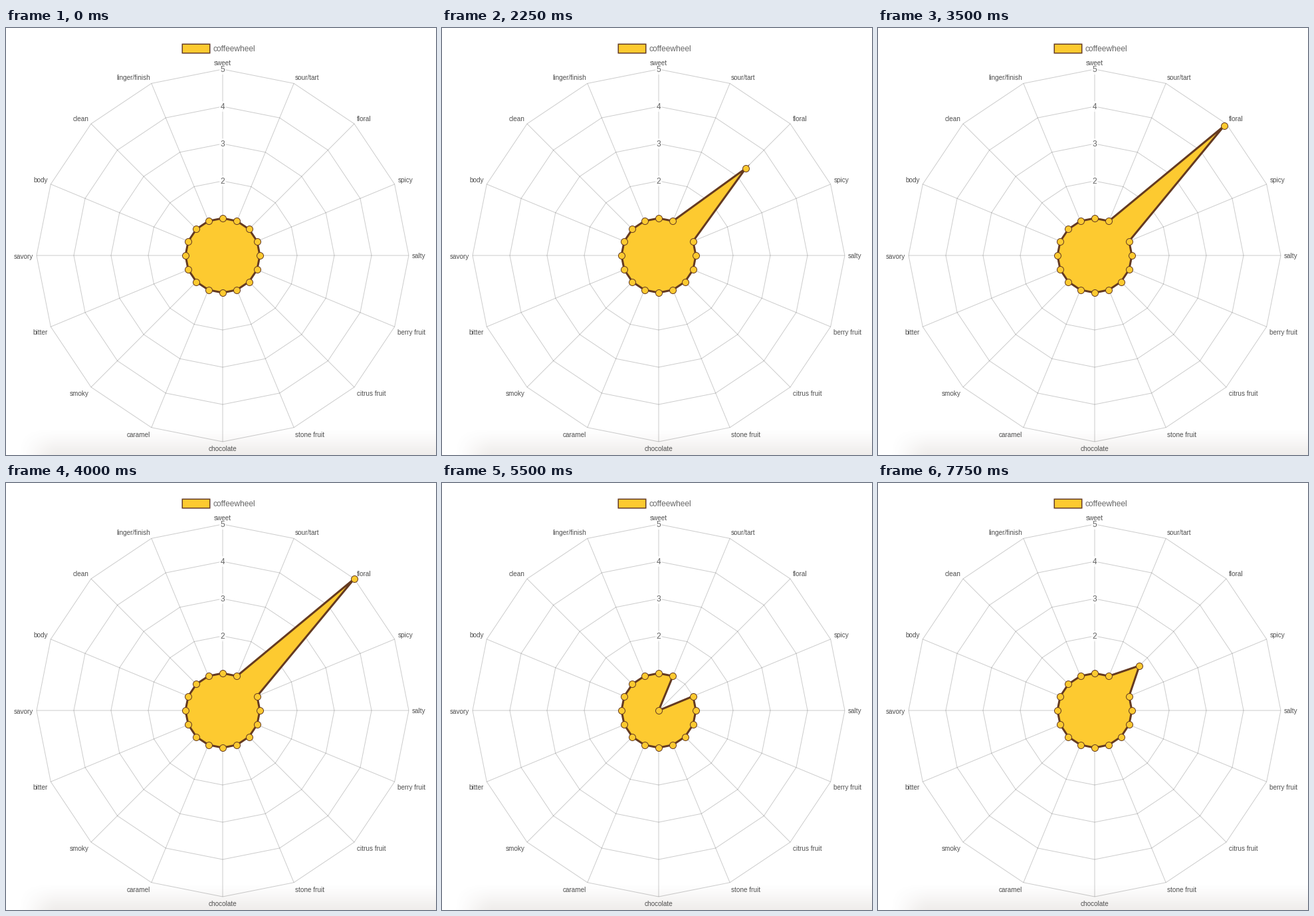
Write a matplotlib script that moves like this. It is 647x642 px and loops after 8000 ms.

```python
import numpy as np
import matplotlib.pyplot as plt
from matplotlib.animation import FuncAnimation
from matplotlib.patches import Polygon, Rectangle

W, H, DPI = 647, 642, 100
PX = 72 / DPI  # points per pixel
CX, CY, UNIT = 326, 342, 56
YELLOW, BROWN = "#fdca30", "#643a21"
GRID = (0, 0, 0, 0.2)
STEP, LOOP = 250, 8000

LABELS = ["sweet", "sour/tart", "floral", "spicy", "salty", "berry fruit",
          "citrus fruit", "stone fruit", "chocolate", "caramel", "smoky",
          "bitter", "savory", "body", "clean", "linger/finish"]
N = len(LABELS)
MOVER = LABELS.index("floral")
ANGLES = np.arange(N) * 2 * np.pi / N
AXES = np.column_stack([np.sin(ANGLES), -np.cos(ANGLES)])
CENTER = np.array([CX, CY])

# start ms, duration ms, from, to
MOVES = [(340, 1000, 1, 2), (2018, 1000, 2, 4), (3040, 1000, 4, 5),
         (4458, 875, 5, 0), (5525, 1000, 0, 2), (7665, 1000, 2, 1)]

fig = plt.figure(figsize=(W / DPI, H / DPI), dpi=DPI, facecolor="white")
ax = fig.add_axes([0, 0, 1, 1])
ax.set_xlim(0, W)
ax.set_ylim(H, 0)
ax.axis("off")


def text(x, y, s, size, color, ha="center", z=4):
    ax.text(x, y, s, fontsize=size * PX, color=color, ha=ha, va="baseline",
            family="Liberation Sans", zorder=z)


def smooth(x, lo, hi):
    t = np.clip((x - lo) / (hi - lo), 0, 1)
    return t * t * (3 - 2 * t)


def draw_shadow():
    top = 596
    y, x = np.mgrid[top:H, 0:W] + 0.5
    rgba = np.empty(x.shape + (4,))
    rgba[..., :3] = np.array([120, 100, 85]) / 255
    rgba[..., 3] = 0.13 * smooth(y, 598, 652) * smooth(x, 14, 80)
    ax.imshow(rgba, extent=(0, W, H, top), aspect="auto",
              interpolation="nearest", zorder=0)
    ax.set_xlim(0, W)
    ax.set_ylim(H, 0)


def draw_grid():
    for r in range(1, 6):
        ax.add_patch(Polygon(CENTER + AXES * r * UNIT, fill=False, ec=GRID,
                             lw=PX, snap=False, zorder=1))
    for dx, dy in AXES * 5 * UNIT:
        ax.plot([CX, CX + dx], [CY, CY + dy], color=GRID, lw=PX,
                solid_capstyle="butt", snap=False, zorder=1)


def draw_labels():
    for i, (name, axis) in enumerate(zip(LABELS, AXES)):
        x, y = CENTER + axis * (5 * UNIT + 5)
        if i in (N // 4, 3 * N // 4):
            y -= 5
        elif axis[1] < 0:
            y -= 10
        ha = "center" if i % (N // 2) == 0 else "left" if i < N // 2 else "right"
        text(x, y + 9.5, name, 10, "#505050", ha)
    for r in range(2, 6):
        y = CY - r * UNIT
        ax.add_patch(Rectangle((CX - 5.3, y - 8), 10.6, 16, fc="white",
                               alpha=0.75, lw=0, zorder=2))
        text(CX, y + 4.3, str(r), 12, "#666666")


def draw_legend():
    for grow, color in ((1.5, BROWN), (0, YELLOW)):
        ax.add_patch(Rectangle((266 - grow, 25 - grow), 40 + 2 * grow,
                               12 + 2 * grow, fc=color, lw=0, snap=False,
                               zorder=3))
    text(312, 35.2, "coffeewheel", 12, "#666666", "left")


def value(ms):
    v = MOVES[0][2]
    for start, length, a, b in MOVES:
        if ms >= start:
            t = min((ms - start) / length, 1)
            v = a + (b - a) * (1 - (1 - t) ** 4)
    return v


def spike(pts):
    """Corner of the mitred outline at the moving point, limit 10."""
    p = pts[MOVER]
    sides = [p - pts[MOVER - 1], p - pts[MOVER + 1]]
    u, w = [s / np.hypot(*s) for s in sides]
    sin_half = np.sqrt(max((1 - u @ w) / 2, 1e-9))
    out = (p - CENTER) @ AXES[MOVER]
    if out < 1.3 * UNIT or sin_half < 0.1:
        return np.array([p, p, p])
    tip = p + AXES[MOVER] * 1.5 / sin_half
    left = p + 1.5 * np.array([u[1], -u[0]])
    right = p + 1.5 * np.array([-w[1], w[0]])
    return np.array([p, left, tip, right])


draw_shadow()
draw_grid()
draw_labels()
draw_legend()

start_pts = CENTER + AXES * UNIT
area = ax.add_patch(Polygon(start_pts, fc=YELLOW, ec=BROWN, lw=3 * PX,
                            joinstyle="miter", snap=False, zorder=5))
corner = ax.add_patch(Polygon(start_pts[:3], fc=BROWN, lw=0, snap=False,
                              zorder=6))
dots, = ax.plot([], [], "o", ms=10 * PX, mfc=YELLOW, mec=BROWN, mew=PX,
                snap=False, zorder=7)


def update(i):
    values = np.ones(N)
    values[MOVER] = value(i * STEP)
    pts = CENTER + AXES * UNIT * values[:, None]
    area.set_xy(pts)
    corner.set_xy(spike(pts))
    dots.set_data(pts[:, 0], pts[:, 1])
    return area, corner, dots


anim = FuncAnimation(fig, update, frames=LOOP // STEP, interval=STEP,
                     repeat=True, repeat_delay=0, blit=False)
plt.show()
```
